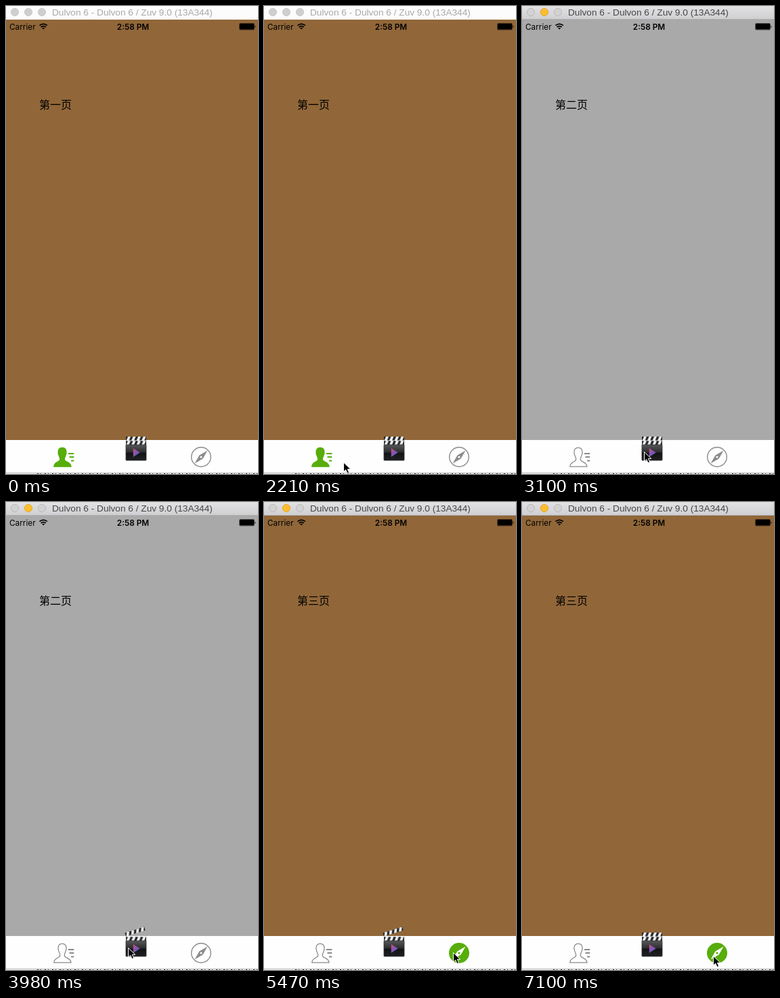
Animation of 372x688 px, one loop 8 s. Source, as an HTML page:

```html
<!DOCTYPE html>
<html lang="en">
<head>
<meta charset="utf-8">
<title>Tab bar demo</title>
<style>
html, body { margin: 0; width: 100%; height: 100%; overflow: hidden; }
svg { display: block; }
.title { font: 13.67px "Liberation Sans", Arial, sans-serif; }
.status { font: 11.8px Inter, sans-serif; }
.page { font: 16px "Noto Sans CJK SC", "Noto Sans CJK", sans-serif; }
</style>
</head>
<body>
<svg width="372" height="688" viewBox="0 0 372 688">
  <defs>
    <linearGradient id="chrome" x2="0" y2="1">
      <stop stop-color="#e2e1e3"/><stop offset=".95" stop-color="#d0cfd2"/>
      <stop offset=".95" stop-color="#b0b0b0"/>
    </linearGradient>
    <linearGradient id="board" x2="0" y2="1">
      <stop stop-color="#56585a"/><stop offset=".48" stop-color="#2c2d2f"/>
      <stop offset=".52" stop-color="#121315"/><stop offset="1" stop-color="#1f2022"/>
    </linearGradient>
    <linearGradient id="play" x2=".7" y2="1">
      <stop stop-color="#d9487c"/><stop offset=".5" stop-color="#8a55ae"/><stop offset="1" stop-color="#4163bd"/>
    </linearGradient>
    <pattern id="stripes" width="7.5" height="6" patternUnits="userSpaceOnUse">
      <rect width="7.5" height="6" fill="#232426"/>
      <path d="M.5 6L3 0H7L4.5 6Z" fill="#f0f0f0"/>
    </pattern>
  </defs>

  <rect id="bg" y="20" width="372" height="618"/>
  <rect id="bar" width="372" height="20"/>
  <g id="buttons" stroke-width=".8">
    <circle cx="13" cy="9" r="5.6"/><circle cx="33" cy="9" r="5.6"/><circle cx="53" cy="9" r="5.6"/>
  </g>
  <text id="title" class="title" x="68" y="14">Dulvon 6 - Dulvon 6 / Zuv 9.0 (13A344)</text>

  <g class="status">
    <text x="5" y="34.5">Carrier</text>
    <text x="187.5" y="34.5" text-anchor="middle" font-weight="600">2:58 PM</text>
  </g>
  <path d="M49.5 28.6q5.7-4.6 11.4 0M51.6 31q3.6-2.8 7.2 0" fill="none" stroke="#000" stroke-width="1.7"/>
  <path d="M53.2 32.4q2-1.4 4 0l-2 2z"/>
  <rect x="344.5" y="25.5" width="22" height="9.5" rx="1.5" fill="none" stroke="#000" stroke-opacity=".5"/>
  <rect x="345" y="26" width="21" height="8.5" rx=".8"/>
  <path d="M367.5 28.5q2 1.8 0 3.6z"/>
  <text id="label" class="page" x="49" y="150.6"></text>

  <rect y="638" width="372" height="50" fill="#fefefe"/>
  <path d="M0 686.5H372" stroke="#b4b4b4"/>
  <path d="M46 687.5H372" stroke="#333" stroke-dasharray="2 3 1 5"/>

  <g id="person" stroke-width="1.3">
    <path d="M83 649.3C90 649.3 90 657 87.5 662C86 665 86 667 87 668.3C89 670.5 96 671 96 677.2H70.8C70.8 671 77 670.5 79 668.3C80 667 80 665 78.5 662C76 657 76 649.3 83 649.3Z"/>
    <path d="M92 658H100.3M93.5 663H100.3M96 668.5H100.3" stroke-width="1.9"/>
  </g>
  <g id="compass" stroke-width="1.4">
    <circle cx="288" cy="663" r="14.3"/>
    <path id="needle" stroke="none" d="M297.5 653.5L290.6 665.6L278.5 672.5L285.4 660.4Z"/>
    <circle id="pin" cx="288" cy="663" r="1.6" stroke="none"/>
  </g>

  <g id="arm"><rect width="30" height="5.5" transform="translate(177 633)" fill="url(#stripes)"/></g>
  <rect width="30" height="6" transform="translate(177 639.2)" fill="url(#stripes)"/>
  <rect x="177" y="645" width="30" height="23" rx=".8" fill="url(#board)" stroke="#2d2e30" stroke-width=".8"/>
  <path d="M187.8 650.3L197.8 656.6L187.8 663Z" fill="url(#play)"/>

  <path id="cursor" d="M.5 .5V14.2L3.7 11.3L6 16.6L8.6 15.5L6.3 10.4H10.8Z" stroke="#fff"/>
</svg>
<script>
const LOOP = 8000, STEP = 148, GREEN = '#57ad0a', GREY = '#8b8b8b';
const $ = id => document.getElementById(id);
const set = (id, attrs) => { for (const k in attrs) $(id).setAttribute(k, attrs[k]); };

// Progress 0..1 in a number of held steps; the first step happens at start
const progress = (t, start, count) =>
  Math.max(0, Math.min(1, (Math.floor((t - start) / STEP + .08) + 1) / count));
const ease = p => p * p * (3 - 2 * p);

// The pointer enters from below the stage, then makes these moves
const entry = { x: 304, y: 690 };
const moves = [
  { start: 140, count: 4, x: 242, y: 595 },
  { start: 1030, count: 4, x: 170, y: 469 },
  { start: 1620, count: 4, x: 95, y: 676 },
  { start: 2210, count: 3, x: 180, y: 655 },
  { start: 4430, count: 6, x: 279, y: 662 },
  { start: 6660, count: 2, x: 260, y: 668 },
  { start: 6960, count: 2, x: 282, y: 667 }
];

function pointer(t) {
  let { x, y } = entry;
  for (const m of moves) {
    const p = ease(progress(t, m.start, m.count));
    x += (m.x - x) * p;
    y += (m.y - y) * p;
  }
  return `translate(${x} ${y})`;
}

function draw(t) {
  const active = t >= 2950;
  const page = t < 3100 ? 0 : t < 5470 ? 1 : 2;

  set('bg', { fill: page === 1 ? '#a9a9a9' : '#916739' });
  $('label').textContent = '第' + '一二三'[page] + '页';
  set('bar', { fill: active ? 'url(#chrome)' : '#fcfcfc' });
  set('title', { fill: active ? '#474747' : '#a9a9a9' });
  set('buttons', { fill: active ? '#d3d2d3' : '#cfcfcf', stroke: active ? '#b3b2b3' : '#c2c2c2' });
  const minimize = $('buttons').children[1].style;
  minimize.fill = active ? '#fdbd2e' : '';
  minimize.stroke = active ? '#dfa023' : '';

  const first = page === 0, last = page === 2;
  set('person', { fill: first ? GREEN : 'none', stroke: first ? GREEN : GREY });
  set('compass', { fill: last ? GREEN : 'none', stroke: last ? GREEN : GREY });
  set('needle', { fill: last ? '#fff' : GREY });
  set('pin', { fill: last ? GREEN : '#fff' });

  const open = progress(t, 3250, 6) - progress(t, 5620, 7);
  set('arm', { transform: `rotate(${-17 * open} 177 638.5)` });
  set('cursor', { transform: pointer(t) });
}

const begin = performance.now();
function tick() {
  draw((performance.now() - begin) % LOOP);
  requestAnimationFrame(tick);
}
tick();
</script>
</body>
</html>
```
